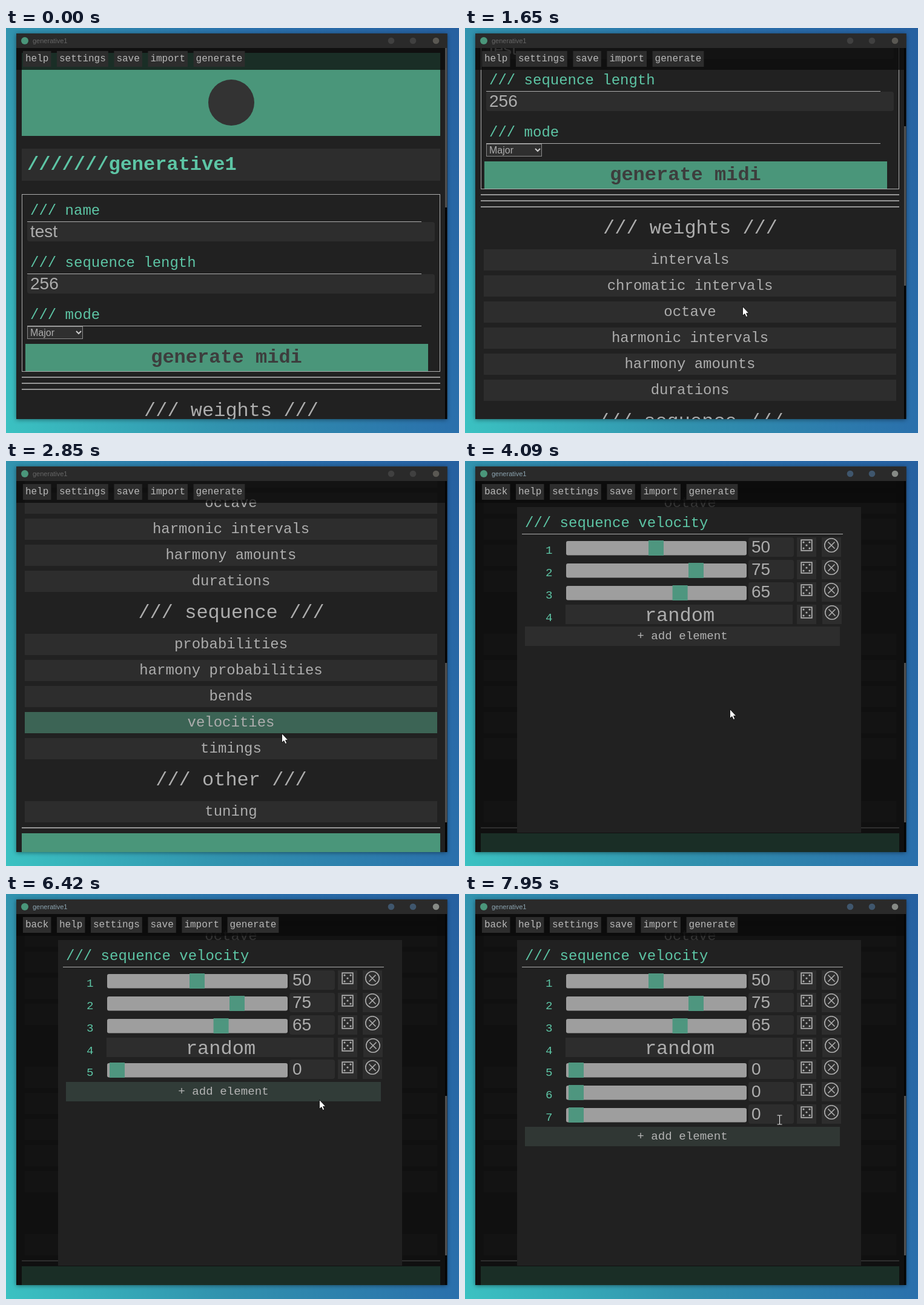
Animation of 748 by 668 pixels, one loop 8000 ms. Source, as an HTML page:

```html
<!DOCTYPE html>
<html lang="en">
<head>
<meta charset="utf-8">
<title>generative1</title>
<style>
  html, body { margin: 0; width: 100%; height: 100%; overflow: hidden; background: #2a70ac; }
  #stage {
    position: relative; width: 748px; height: 668px; overflow: hidden;
    background: linear-gradient(62deg, #3bc2c2, #3192ae 33%, #2a70ac 68%, #2660a0);
  }
  #shadow { position: absolute; left: 17px; top: 9px; width: 711px; height: 636px; box-shadow: 0 1px 7px rgba(0, 0, 0, .45); }
  svg { position: absolute; left: 0; top: 0; display: block; }
  text { font-family: "Liberation Mono", "Courier New", monospace; }
  .sans { font-family: "Liberation Sans", Arial, sans-serif; }
</style>
</head>
<body>
<div id="stage">
  <div id="shadow"></div>
  <svg id="art" width="748" height="668" viewBox="0 0 748 668"></svg>
</div>
<script>
const LOOP = 8000;
const GREEN = [74, 150, 122], PANEL = [45, 45, 45], INK = [61, 61, 61], PALE = [170, 170, 170];
const MINT = '#5dc5a5', GREY = '#adadad', BOX = '#2d2d2d', BODY = '#212121';
const DIM = 'rgba(10,10,10,.74)';

// ---- drawing helpers ----
const rgb = c => `rgb(${c.map(Math.round)})`;
const rect = (x, y, w, h, fill, extra = '') =>
  `<rect x="${x}" y="${y}" width="${w}" height="${h}" fill="${fill}" ${extra}/>`;
const text = (x, y, str, size, fill, extra = '') =>
  `<text x="${x}" y="${y}" font-size="${size}" fill="${fill}" ${extra}>${str}</text>`;
const disc = (x, y, r, fill, extra = '') => `<circle cx="${x}" cy="${y}" r="${r}" fill="${fill}" ${extra}/>`;
const group = (id, body, extra = '') => `<g id="${id}" ${extra}>${body}</g>`;
const MID = 'text-anchor="middle"', SANS = 'class="sans"', BOLD = 'font-weight="700"';

function navBar(labels) {
  let x = 28;
  return labels.map(label => {
    const w = label.length * 9.6 + 8;
    const out = rect(x, 38, w, 26, BOX) + text(x + 4, 55, label, 16, '#b8b8b8');
    x += w + 9.6;
    return out;
  }).join('');
}

function field(y, label, value) {
  const head = text(40, y, '/// ' + label, 24, MINT) + rect(35, y + 11, 651, 1, GREY);
  return value ? head + rect(35, y + 12, 673, 32, BOX, 'rx="4"') + text(40, y + 37, value, 28, GREY, SANS) : head;
}

function section(y, title, items) {
  return text(372, y, `/// ${title} ///`, 32, GREY, MID) + items.map((name, i) => {
    const top = y + 26 + i * 43;
    return rect(31, top, 681, 35, BOX, `id="item-${name.replace(' ', '-')}"`) +
      text(371.5, top + 24, name, 24, GREY, MID);
  }).join('');
}

const rule = y => rect(26, y, 691, 2, '#969696');

function page() {
  return rect(26, 41, 691, 137, rgb(GREEN)) + disc(372, 123, 38, '#333') +
    rect(26, 199, 691, 53, BOX) + text(35, 234, '///////generative1', 32, MINT, BOLD) +
    rect(26.5, 274.5, 690, 292, 'none', `stroke="${GREY}"`) +
    field(308, 'name', 'test') + field(394, 'sequence length', '256') + field(480, 'mode') +
    rect(35.5, 492.5, 91, 20, '#2f2f2f', 'stroke="#8a8a8a"') + text(40, 508, 'Major', 16, GREY, SANS) +
    '<path d="M116 500l4 4 4-4" fill="none" stroke="#ccc" stroke-width="2"/>' +
    rect(32, 521, 665, 45, rgb(GREEN)) +
    text(364, 552, 'generate midi', 32, rgb(INK), `id="make" ${BOLD} ${MID}`) +
    rule(575) + rule(585) + rule(595) +
    section(640, 'weights', ['intervals', 'chromatic intervals', 'octave', 'harmonic intervals', 'harmony amounts', 'durations']) +
    section(959, 'sequence', ['probabilities', 'harmony probabilities', 'bends', 'velocities', 'timings']) +
    section(1235, 'other', ['tuning']) +
    rule(1304) + rect(26, 1314, 691, 137, rgb(GREEN));
}

// ---- sequence editor ----
const rowTop = i => 126 + Math.round(i * 36.8);
const addTop = count => Math.round(126 + count * 36.8);

function rowButtons(y, dx) {
  const dots = [[-5, -5], [5, -5], [0, 0], [-5, 5], [5, 5]]
    .map(([x, v]) => disc(564 + x, y + 13 + v, 1.6, GREY)).join('');
  return rect(548, y, 32, 32, BOX) +
    rect(555.2, y + 4.2, 17.6, 17.6, 'none', `stroke="${GREY}" stroke-width="1.8"`) + dots +
    rect(589 + dx, y, 32, 32, BOX) +
    disc(605 + dx, y + 13, 11.2, 'none', `stroke="${GREY}" stroke-width="1.6"`) +
    `<path d="M${599.5 + dx} ${y + 7.5}l11 11m0-11l-11 11" stroke="${GREY}" stroke-width="1.6"/>`;
}

function row(value, i) {
  const y = rowTop(i) + (i === 3 ? 1 : 0);
  const label = text(133, y + 27, i + 1, 19.2, MINT);
  if (value === null) {
    return group('row' + i, label + rect(166, y, 375, 32, BOX, 'id="random"') +
      text(354.5, y + 27, 'random', 32, GREY, MID) + rowButtons(y, 1));
  }
  const slider = group('slider' + i,
    rect(167, y + 6, 298, 23.5, '#d3d3d3', 'rx="3"') +
    rect((171 + 2.64 * value).toFixed(1), y + 5, 25, 25, '#61c8a8'), 'opacity=".7"');
  return group('row' + i, label + slider + rect(468, y, 75, 32, BOX, 'rx="4"') +
    text(473, y + 25, value, 28, GREY, SANS) + rowButtons(y, 0));
}

const VALUES = [50, 75, 65, null, 0, 0, 0];
const editor = rect(17, 33, 708, 612, DIM) + rect(86, 76, 568, 537, BODY) +
  text(99, 109, '/// sequence velocity', 24, MINT) + rect(94, 120, 530, 1, GREY) +
  VALUES.map(row).join('') +
  group('add', rect(99, 0, 520, 32, BOX, 'id="addBox"') + text(359, 21, '+ add element', 19.2, '#b4b4b4', MID));

const NAV = ['help', 'settings', 'save', 'import', 'generate'];
document.getElementById('art').innerHTML =
  '<clipPath id="view"><rect x="17" y="33" width="711.5" height="612"/></clipPath>' +
  rect(17, 9, 711.5, 636, BODY) + rect(17, 9, 711.5, 24, '#2a2a2a') +
  disc(31, 21, 6, rgb(GREEN)) + text(44, 25, 'generative1', 11, '#666', `id="caption" ${SANS}`) +
  [636, 672, 710].map((x, i) => disc(x, 21, 5.3, '#404040', `id="dot${i}"`)).join('') +
  '<g clip-path="url(#view)">' + group('page', page()) + group('editor', editor) +
  rect(17, 33, 708, 36, DIM) + group('navMain', navBar(NAV)) + group('navEdit', navBar(['back', ...NAV])) +
  rect(725, 33, 3.5, 612, '#050505') + rect(725, 33, 3.5, 263, '#505050', 'id="thumb"') + '</g>' +
  group('cursor',
    '<path id="arrow" d="M0 0V15L3.4 11.9 5.7 17 8.2 15.9 6 10.9H10.3Z" fill="#fff" stroke="#000" stroke-width=".8"/>' +
    '<path id="beam" d="M-4-7.5H-1L0-7 1-7.5H4M0-7V7M-4 7.5H-1L0 7 1 7.5H4" fill="none" stroke="#e8e8e8" stroke-width="1.1"/>');

const $ = id => document.getElementById(id);
const show = (id, on) => $(id).setAttribute('display', on ? 'inline' : 'none');
const fill = (id, color) => $(id).setAttribute('fill', color);
const move = (id, x, y) => $(id).setAttribute('transform', `translate(${x} ${y})`);

// ---- timing ----
const OPEN = 3400, FOCUS = 3370;
const CLICKS = [6080, 6990, 7700];

const SCROLLS = [[826, 455, 300], [1635, 310, 200], [2265, 310, 200]]; // start, length, distance

const PATH = [ // time, x, y
  [230, 678, 645], [420, 588, 560], [540, 500, 490], [630, 458, 459], [2770, 458, 459], [2990, 449, 432],
  [3199, 449, 432], [3200, 444, 428], [4060, 444, 428], [4090, 437, 409], [4400, 395, 290],
  [4620, 364, 221], [4890, 361, 217], [4930, 361, 218], [5010, 361, 232], [5140, 450, 284],
  [5330, 520, 273], [5430, 544, 271], [5840, 544, 271], [5960, 538, 284], [6080, 530, 290],
  [6250, 520, 322], [6330, 518, 345], [6440, 517, 338], [6640, 517, 331], [7225, 517, 331],
  [7275, 517, 347], [7530, 519, 372], [8000, 519, 372]
];

const HOVER = { // time, level to reach, length
  make: [[400, .5, 150], [490, 0, 130]],
  item: [[2790, 1, 200]],
  slider: [[4590, 1, 200], [4995, 0, 200]],
  random: [[5022, 1, 400], [5102, 0, 150]],
  add: [[5100, 1, 400], [5330, 0, 370], [5870, 1, 400], [6100, 0, 400], [6380, 1, 400],
    [7098, 0, 400], [7275, 1, 235], [7700, 0, 400]]
};

const clamp = p => Math.max(0, Math.min(1, p));
const inOut = p => p < .5 ? 2 * p * p : 1 - 2 * (1 - p) * (1 - p);
const mix = (a, b, p) => rgb(a.map((v, i) => v + (b[i] - v) * p));

// CSS "ease", cubic-bezier(.25, .1, .25, 1)
function ease(p) {
  const bez = (a, b, u) => 3 * a * u * (1 - u) ** 2 + 3 * b * u * u * (1 - u) + u ** 3;
  let lo = 0, hi = 1;
  for (let i = 0; i < 18; i++) {
    const u = (lo + hi) / 2;
    if (bez(.25, .25, u) < p) lo = u; else hi = u;
  }
  return bez(.1, 1, lo);
}

function hover(name, t) {
  let level = 0;
  const steps = HOVER[name];
  steps.forEach(([start, goal, length], i) => {
    if (t < start) return;
    const end = i + 1 < steps.length ? Math.min(t, steps[i + 1][0]) : t;
    level += (goal - level) * ease(clamp((end - start) / length));
  });
  return level;
}

function pointer(t) {
  const i = PATH.findIndex(k => k[0] > t);
  if (i < 1) return [PATH[0][1], PATH[0][2]];
  const [t0, x0, y0] = PATH[i - 1], [t1, x1, y1] = PATH[i];
  const p = (t - t0) / (t1 - t0);
  return [Math.round(x0 + (x1 - x0) * p), Math.round(y0 + (y1 - y0) * p)];
}

function draw(t) {
  const scroll = Math.round(SCROLLS.reduce((sum, [s, d, px]) => sum + px * inOut(clamp((t - s) / d)), 0));
  move('page', 0, -scroll);
  $('thumb').setAttribute('y', 33 + Math.round(scroll * .4286));
  fill('make', mix(INK, PALE, hover('make', t)));

  const open = t >= OPEN, active = t >= FOCUS;
  fill('item-velocities', mix(PANEL, GREEN, open ? 0 : hover('item', t)));
  show('editor', open);
  show('navEdit', open);
  show('navMain', !open);
  fill('caption', active ? '#8ba3af' : '#666');
  fill('dot0', active ? '#3f566d' : '#404040');
  fill('dot1', active ? '#3f566d' : '#404040');
  fill('dot2', active ? '#868a86' : '#5a5853');

  const count = 4 + CLICKS.filter(c => t >= c).length;
  VALUES.forEach((_, i) => show('row' + i, i < count));
  move('add', 0, addTop(count));
  fill('addBox', mix(PANEL, GREEN, hover('add', t)));
  fill('random', mix(PANEL, GREEN, hover('random', t)));
  $('slider2').setAttribute('opacity', .7 + .3 * hover('slider', t));

  const [x, y] = pointer(t);
  const typing = open && x >= 468 && x <= 543 && VALUES.some((v, i) =>
    i < count && v !== null && y >= rowTop(i) && y < rowTop(i) + 32);
  show('cursor', t >= PATH[0][0]);
  show('arrow', !typing);
  show('beam', typing);
  move('cursor', x + .5, y + .5);
}

const origin = performance.now();
function tick() {
  draw((performance.now() - origin) % LOOP);
  requestAnimationFrame(tick);
}
tick();
</script>
</body>
</html>
```
